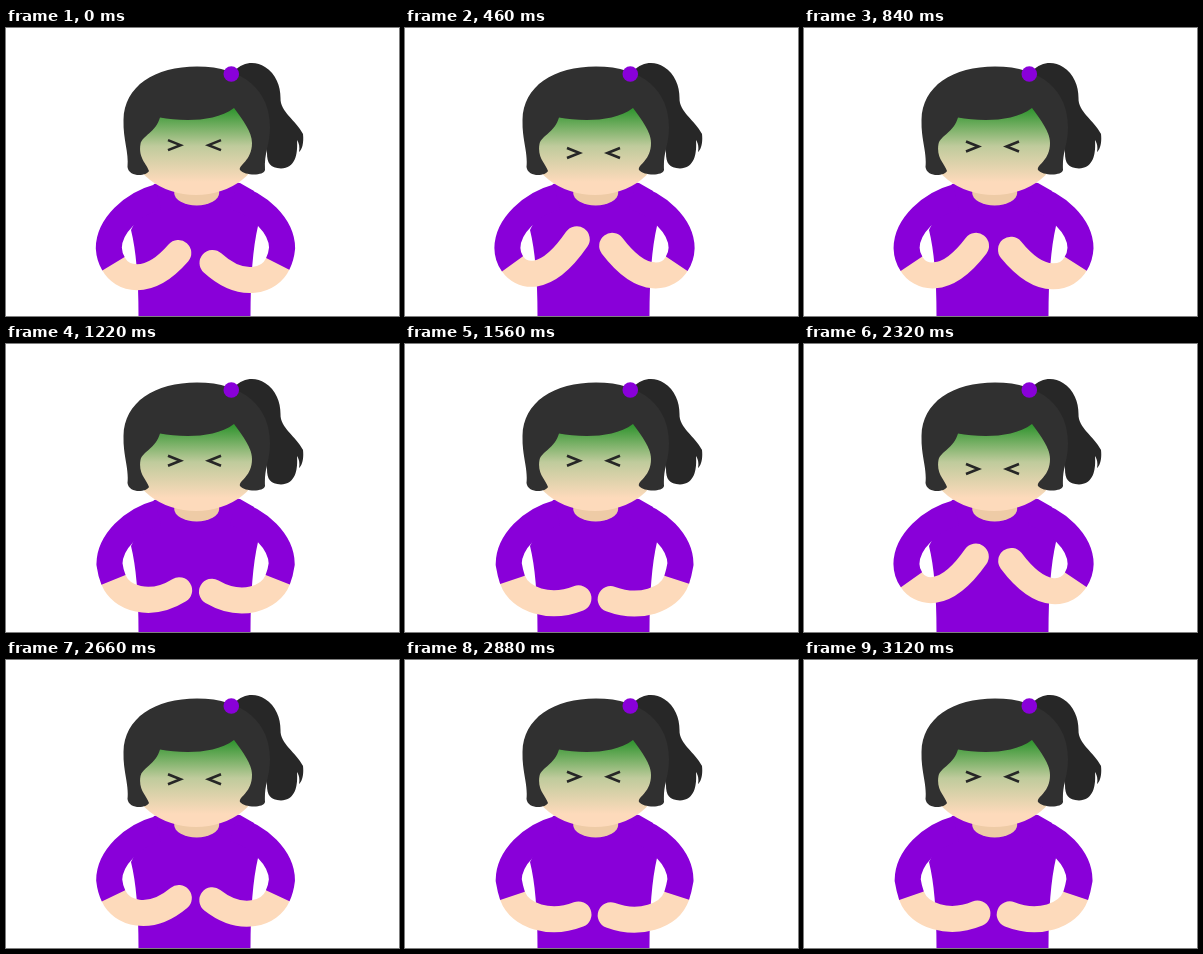
Animation, 393 px wide and 288 px high, one loop 3140 ms. Source, as an HTML page:

```html
<!DOCTYPE html>
<html lang="en">
<head>
<meta charset="utf-8">
<title>Queasy girl</title>
<style>
  html, body { margin: 0; width: 100%; height: 100%; overflow: hidden; background: #fff; }
  svg { display: block; width: 393px; height: 288px; }
  .limb { fill: none; stroke-width: 26; }
  .skin { stroke: #fddabb; stroke-linecap: round; }
  .sleeve { stroke: #8900d9; }
  .eye { fill: none; stroke: #262626; stroke-width: 2.6; }
</style>
</head>
<body>
<svg viewBox="0 0 393 288">
  <defs>
    <linearGradient id="sick" gradientUnits="userSpaceOnUse" x1="0" y1="82" x2="0" y2="154">
      <stop offset="0" stop-color="#349632"/>
      <stop offset=".5" stop-color="#bfcb9c"/>
      <stop offset="1" stop-color="#fddabb"/>
    </linearGradient>
  </defs>

  <path fill="#8900d9" d="M148 156Q190 148 234 155L248 163L252 198Q244.500 230 244.500 288H132.500Q132.500 232 125 202Z"/>
  <ellipse cx="190.7" cy="165" rx="22.5" ry="12.5" fill="#eecba6"/>

  <path fill="#272727" d="M228 43C238 33 250 33 259 39C270 46 274.500 58 274.500 70C274 84 290 92 297 106
    C298 115 296 122 293 124C294 119 293 115 291 112C292 127 289 140 275 140.500C264 140 261 135 261 125L250 70Z"/>
  <ellipse cx="190" cy="116" rx="65" ry="51" fill="url(#sick)"/>
  <path fill="#303030" d="M121.500 139C123 124 117 112 117.500 92C118 58 149 38.500 191 38.500C238 38.500 264 63 264 99
    C264 117 258 124 259 142C258 148 239 148 234 142C232 137 246 133 246 115C246 104 237 92 228 80
    C208 95 174 93 154 89.500C150 104 136 108 134.500 116C132 130 141 136 143 143C141 148 123 150 121.500 139Z"/>
  <circle cx="225.300" cy="46" r="7.800" fill="#8900d9"/>

  <path id="eyeL" class="eye" d="M162 -5L174.500 0L162 5"/>
  <path id="eyeR" class="eye" d="M215 -5L202.500 0L215 5"/>

  <g>
    <path id="foreL" class="limb skin"/>
    <path id="upperL" class="limb sleeve"/>
  </g>
  <g transform="matrix(-1 0 0 1 379.200 0)">
    <path id="foreR" class="limb skin"/>
    <path id="upperR" class="limb sleeve"/>
  </g>
</svg>
<script>
const LOOP = 3140;
const FIRST_TOP = 670, HALF_SWING = 775;
const LOW = 263;
const el = id => document.getElementById(id);
const mix = (a, b, u) => a + (b - a) * u;

// Lift from the rest pose, then swing evenly between the top and LOW.
function handY(t, rest, top) {
  if (t < FIRST_TOP) return mix(rest, top, t / FIRST_TOP);
  const phase = (t - FIRST_TOP) / HALF_SWING % 2;
  return mix(top, LOW, 1 - Math.abs(1 - phase));
}

// The eyes dip twice per loop, squeezing down and easing back.
function eyeY(t) {
  const dip = at => Math.max(0, 1 - Math.abs(t - at) / 480);
  return 116.8 + 8.2 * (dip(460) + dip(2320));
}

function poseArm(side, y) {
  const d = y - 225;
  const cuffX = 107.5, cuffY = 235.8;
  const lean = 0.6 - d * 0.009;
  el('upper' + side).setAttribute('d',
    `M152 169C126 176 ${103 + d * 0.03} 198 ${102.8 + d * 0.03} 220` +
    `Q${cuffX - 7 * lean} ${cuffY - 7} ${cuffX} ${cuffY}`);
  el('fore' + side).setAttribute('d',
    `M${cuffX} ${cuffY}C115 ${250 + d * 0.22} ${141 + d * 0.15} ${261 + d * 0.15} ${172.3 + d * 0.04} ${y}`);
}

function draw(t) {
  poseArm('L', handY(t, 225, 205));
  poseArm('R', handY(t, 235, 210));
  for (const id of ['eyeL', 'eyeR']) {
    el(id).setAttribute('transform', `translate(0 ${eyeY(t)})`);
  }
}

const start = performance.now();
function tick() {
  draw((performance.now() - start) % LOOP);
  requestAnimationFrame(tick);
}
tick();
</script>
</body>
</html>
```
